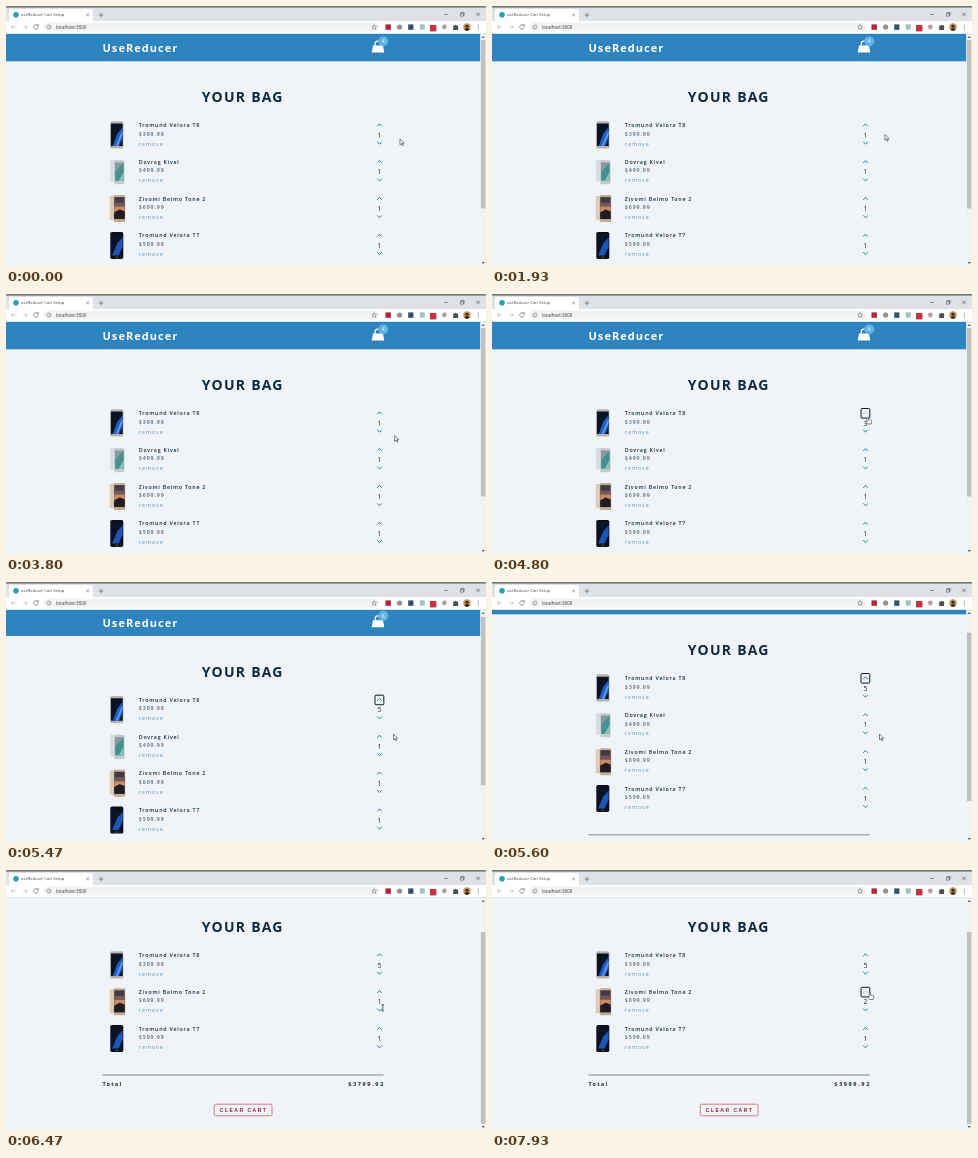
Animation of 480x260 px, one loop 8000 ms. Source, as an HTML page:

```html
<!DOCTYPE html>
<html lang="en">
<head>
<meta charset="utf-8">
<title>Cart</title>
<style>
  html, body { margin: 0; width: 100%; height: 100%; overflow: hidden; background: #f0f4f8; }
  svg { display: block; width: 480px; height: 260px; font-family: "Open Sans", "Noto Sans", sans-serif; }
</style>
</head>
<body>
<svg id="stage" viewBox="0 0 480 260"></svg>
<script>
const LOOP = 8000, ROW = 36.8, LAG = 60, VIEW_TOP = 28, VIEW_H = 232;
const NAVY = '#102a42', SLATE = '#4d657c', LINK = '#5c95b9', ARROW = '#2c7f9f', FAINT = '#b4d0df';
const stage = document.getElementById('stage');

function add(parent, tag, attrs = {}, text) {
  const node = document.createElementNS('http://www.w3.org/2000/svg', tag);
  set(node, attrs);
  if (text !== undefined) node.textContent = text;
  return parent.appendChild(node);
}
function set(node, attrs) {
  for (const key in attrs) node.setAttribute(key, attrs[key]);
}
const rect = (p, x, y, width, height, fill, rx = 0) => add(p, 'rect', { x, y, width, height, fill, rx });
const circle = (p, cx, cy, r, fill) => add(p, 'circle', { cx, cy, r, fill });
const fillPath = (p, d, fill) => add(p, 'path', { d, fill });
const line = (p, d, stroke, width = 0.7) =>
  add(p, 'path', { d, stroke, fill: 'none', 'stroke-width': width });
const label = (p, x, y, size, fill, text, spacing = 0, weight = 400, extra = {}) =>
  add(p, 'text', { x, y, fill, 'font-size': size, 'letter-spacing': spacing, 'font-weight': weight, ...extra }, text);
const show = (node, on) => set(node, { visibility: on ? 'visible' : 'hidden' });

// Phone pictures, drawn in a 16 x 28 box
const phones = [
  p => {
    rect(p, 0.5, 0.3, 13.2, 27.2, '#b9b2aa', 1.6);
    rect(p, 1.2, 2.6, 11.8, 22.4, '#0b1322', 0.6);
    fillPath(p, 'M3 25L7.5 13L13 6V17L9.5 25Z', '#1f5fc8');
    fillPath(p, 'M6 25L11 13L13 10V13L8 25Z', '#5f9be8');
  },
  p => {
    rect(p, 0.3, 2, 11, 22, '#d9dcdf', 1.5);
    rect(p, 4.6, 2.5, 10.2, 24, '#c3c9ce', 1.5);
    rect(p, 5.4, 5, 8.6, 18, '#45918f');
    fillPath(p, 'M5.4 5H14L5.4 14Z', '#8b999e');
    fillPath(p, 'M9 23L14 14V23Z', '#8cc4b4');
  },
  p => {
    rect(p, 0, 1.5, 10, 24, '#dccbb5', 1.3);
    rect(p, 4, 0.5, 11.5, 27, '#c4ab93', 1.3);
    rect(p, 4.6, 2.5, 10.3, 22, '#403b46');
    rect(p, 4.6, 8, 10.3, 4, '#74595a');
    fillPath(p, 'M4.6 12H14.9V17L10 15L4.6 18Z', '#cf8a63');
    fillPath(p, 'M4.6 18L10 15L14.9 17V24.5H4.6Z', '#1f1c22');
  },
  p => {
    rect(p, 0.6, 0.5, 13, 27, '#0d1016', 1.6);
    rect(p, 1.3, 3, 11.6, 21, '#0a1328');
    fillPath(p, 'M2.5 24L7.5 12L12.9 6V15L9 24Z', '#1d56b8');
    rect(p, 5.2, 25.4, 3.8, 1, '#4a5058', 0.5);
  }
];

const goods = [
  { name: 'Tromund Velora T8', price: 399.99, adds: [4470, 4730, 4930, 5200] },
  { name: 'Dovrag Kivel', price: 499.99, adds: [], removed: 6450 },
  { name: 'Zivomi Belmo Tone 2', price: 699.99, adds: [7865] },
  { name: 'Tromund Velora T7', price: 599.99, adds: [] }
];
const inCart = (item, t) => !(t >= item.removed);
const quantity = (item, t) => 1 + item.adds.filter(at => t >= at).length;
const cartSum = (t, value) =>
  goods.filter(g => inCart(g, t)).reduce((sum, g) => sum + value(g) * quantity(g, t), 0);

// Page
rect(stage, 0, 0, 480, 260, '#f0f4f8');
const page = add(stage, 'g');
rect(page, 0, 28, 474.5, 27.3, '#2d84be');
label(page, 96.5, 46, 11, '#fff', 'UseReducer', 1.05, 700);
fillPath(page, 'M367 39.5H377L378.3 46.6H365.7Z', '#fff');
line(page, 'M369.2 40V38A2.8 2.8 0 0 1 374.8 38V40', '#fff', 1.2);
circle(page, 377.3, 35.2, 5, '#62b1e4');
const badge = label(page, 377.3, 37.4, 6, '#fff', '4', 0, 400, { 'text-anchor': 'middle' });
label(page, 195.8, 96.3, 14, NAVY, 'YOUR BAG', 1.28, 700);

const chevron = (p, y, dir) => line(p, `M371.2 ${y + dir}L373.5 ${y - dir}L375.8 ${y + dir}`, ARROW, 1);
const rows = goods.map((item, i) => {
  const g = add(page, 'g');
  phones[i](add(g, 'g', { transform: 'translate(103.7 115)' }));
  label(g, 132.8, 121.1, 5.3, NAVY, item.name, 0.76, 600);
  label(g, 132.8, 129.7, 5.3, SLATE, '$' + item.price, 0.9, 600);
  label(g, 132.8, 139.6, 5.3, LINK, 'remove', 1.05);
  const up = chevron(g, 119, 1.2);
  const down = chevron(g, 137, -1.2);
  const count = label(g, 373.5, 131.6, 6.8, '#222c36', '1', 0, 400, { 'text-anchor': 'middle' });
  const focus = add(g, 'rect', { x: 369, y: 114.5, width: 8.8, height: 9.6, rx: 1, fill: 'none', stroke: '#15181c', 'stroke-width': 1 });
  return { g, up, down, count, focus };
});

const footer = add(page, 'g');
line(footer, 'M96.4 275.8H377.6', '#5f6f80', 0.8);
label(footer, 96.5, 287, 5.6, NAVY, 'Total', 1.2, 700);
const total = label(footer, 342.2, 287, 5.6, NAVY, '', 1.6, 700);
add(footer, 'rect', { x: 208.2, y: 305, width: 57.8, height: 11.6, rx: 1.5, fill: 'none', stroke: '#c4646c', 'stroke-width': 0.8 });
label(footer, 213.8, 312.7, 5, '#9e1f2c', 'CLEAR CART', 1.5, 700, { 'font-family': '"Liberation Sans", Arial, sans-serif' });

// Scrollbar
rect(stage, 474.3, 28, 5.7, 232, '#f1f1f1');
fillPath(stage, 'M475.7 32L477.2 30L478.7 32Z', '#555');
fillPath(stage, 'M475.7 256L477.2 258L478.7 256Z', '#555');
const thumb = rect(stage, 474.9, 34, 4.5, 168, '#c1c1c1');

// Browser frame
rect(stage, 0, 0, 480, 16, '#dee1e6');
rect(stage, 0, 0, 480, 1.6, '#73777d');
rect(stage, 3, 3, 84, 13, '#fff', 2);
rect(stage, 0, 15, 480, 13, '#fff');
circle(stage, 10, 8.8, 2.8, '#22a3b8');
label(stage, 15, 10.3, 4.05, '#3c4043', 'useReducer Cart Setup');
line(stage, 'M80.2 7.5L83 10.3M83 7.5L80.2 10.3', '#5f6368', 0.6);
line(stage, 'M92.8 9H97.2M95 6.8V11.2', '#5f6368', 0.7);
line(stage, 'M438 8.5H442M454.4 7.4H457.2V10.2H454.4ZM455.4 7.4V6.4H458.2V9.2H457.2M470.4 6.7L473.8 10.1M473.8 6.7L470.4 10.1', '#333', 0.5);
line(stage, 'M9.6 21H5.2M7.2 19L5.2 21L7.2 23', '#aeb1b4', 0.7);
line(stage, 'M17 21H21.4M19.4 19L21.4 21L19.4 23', '#b8bbbe', 0.7);
line(stage, 'M32 19.5A2.3 2.3 0 1 0 32.3 21.6M32.3 18.3V20H30.5', '#5f6368', 0.7);
rect(stage, 37.5, 16.5, 336, 9, '#f1f3f4', 4.5);
line(stage, 'M40.9 21A2.1 2.1 0 1 1 45.1 21A2.1 2.1 0 1 1 40.9 21M43 20.7V22.2M43 19.6V20.1', '#5f6368', 0.5);
label(stage, 50, 22.7, 4.5, '#303438', 'localhost:3000');
line(stage, 'M368.2 18.6L368.9 20.3L370.7 20.4L369.3 21.6L369.8 23.4L368.2 22.4L366.6 23.4L367.1 21.6L365.7 20.4L367.5 20.3Z', '#5f6368', 0.5);
rect(stage, 379.5, 18.4, 5.4, 5.4, '#b4262f');
circle(stage, 393.6, 21, 2.6, '#8e9296');
rect(stage, 402.2, 18.4, 5.2, 5.4, '#2f5468');
rect(stage, 413.8, 18.4, 5, 5.2, '#9fc3c6');
rect(stage, 424, 19, 6.4, 6.4, '#c0343b');
circle(stage, 438.4, 21, 2.4, '#b79aa2');
fillPath(stage, 'M447.2 19.4H448.8A1 1 0 0 1 450.6 19.4H452V21A1 1 0 0 1 452 22.6V24H447.2Z', '#4b4f53');
circle(stage, 461, 21, 3.7, '#c58f5c');
circle(stage, 461, 20.2, 1.5, '#3a2a24');
fillPath(stage, 'M458.4 23.6A2.7 2.2 0 0 1 463.6 23.6A3.7 3.7 0 0 1 458.4 23.6Z', '#3a2a24');
[19, 21, 23].forEach(y => circle(stage, 472.3, y, 0.55, '#5f6368'));
rect(stage, 0, 27.3, 480, 0.7, '#d3d8dd');

// Pointer
const outline = { fill: '#fff', stroke: '#1c1f23', 'stroke-width': 0.55, 'stroke-linejoin': 'round' };
const pointer = add(stage, 'g');
const cursors = {
  arrow: add(pointer, 'path', { d: 'M0 0V5.8L1.4 4.6L2.3 6.7L3.2 6.3L2.3 4.3H4.1Z', ...outline }),
  hand: add(pointer, 'path', {
    d: 'M-.7 .5Q0 -.5 .7 .5V2.7L3.4 3.2Q4 3.4 3.9 4.4L3.3 7H-.3L-2.3 4.4Q-2.2 3.5 -1.3 4L-.7 4.6Z', ...outline
  }),
  text: line(pointer, 'M-1.2 -.3H1.2M0 -.3V5.8M-1.2 5.8H1.2', '#1c1f23', 0.7)
};

// time, x, y
const route = [
  [1900, 394, 133], [1930, 393, 128.5], [2000, 392.5, 126.5], [2200, 392.5, 126.5],
  [2700, 386, 46], [2930, 388, 35], [3070, 386, 34], [3280, 358, 42], [3480, 392, 62],
  [3680, 400, 138], [3760, 392, 146], [3900, 376, 124], [4730, 375.8, 123], [5230, 375.8, 123],
  [5450, 387.5, 152], [5900, 387.5, 152], [6200, 376.8, 135], [6800, 376.8, 135],
  [7100, 380, 139], [7400, 380, 136], [7700, 377.8, 122.5]
];
const smooth = u => u * u * (3 - 2 * u);
const ramp = (t, from, to) => smooth(Math.min(1, Math.max(0, (t - from) / (to - from))));
function pointerAt(t) {
  const next = route.findIndex(stop => stop[0] > t);
  if (next === 0) return route[0].slice(1);
  if (next < 0) return route[route.length - 1].slice(1);
  const [t0, x0, y0] = route[next - 1], [t1, x1, y1] = route[next];
  const k = ramp(t, t0, t1);
  return [x0 + (x1 - x0) * k, y0 + (y1 - y0) * k];
}

function draw(t) {
  const scroll = 34 * ramp(t, 5440, 5700);
  const within = (from, to) => t >= from && t < to;
  const overUp = [within(3880, 5270), false, t >= 7640, false];
  const overDown = [false, within(6150, 6450), false, false];
  const focused = [within(4470, 6400), false, t >= 7865, false];

  let shown = 0;
  rows.forEach((row, i) => {
    const visible = inCart(goods[i], t);
    set(row.g, { transform: `translate(0 ${shown * ROW})`, display: visible ? 'inline' : 'none' });
    if (visible) shown++;
    row.count.textContent = quantity(goods[i], t);
    set(row.up, { stroke: overUp[i] ? FAINT : ARROW });
    set(row.down, { stroke: overDown[i] ? FAINT : ARROW });
    show(row.focus, focused[i]);
  });

  const gone = (goods.length - shown) * ROW;
  set(page, { transform: `translate(0 ${-scroll})` });
  set(footer, { transform: `translate(0 ${-gone})` });
  // Totals settle shortly after the list does
  badge.textContent = cartSum(t - LAG, () => 1);
  total.textContent = '$' + cartSum(t - LAG, g => g.price).toFixed(2);

  const ratio = 220 / (303 - gone);
  set(thumb, { y: VIEW_TOP + 6 + scroll * ratio, height: VIEW_H * ratio });

  const [x, y] = pointerAt(t);
  const overButton = overUp.includes(true) || overDown.includes(true);
  const kind = overButton ? 'hand' : within(6450, 6870) ? 'text' : 'arrow';
  set(pointer, { transform: `translate(${x} ${y})` });
  for (const name in cursors) show(cursors[name], name === kind);
}

const start = performance.now();
function tick() {
  draw((performance.now() - start) % LOOP);
  requestAnimationFrame(tick);
}
tick();
</script>
</body>
</html>
```
